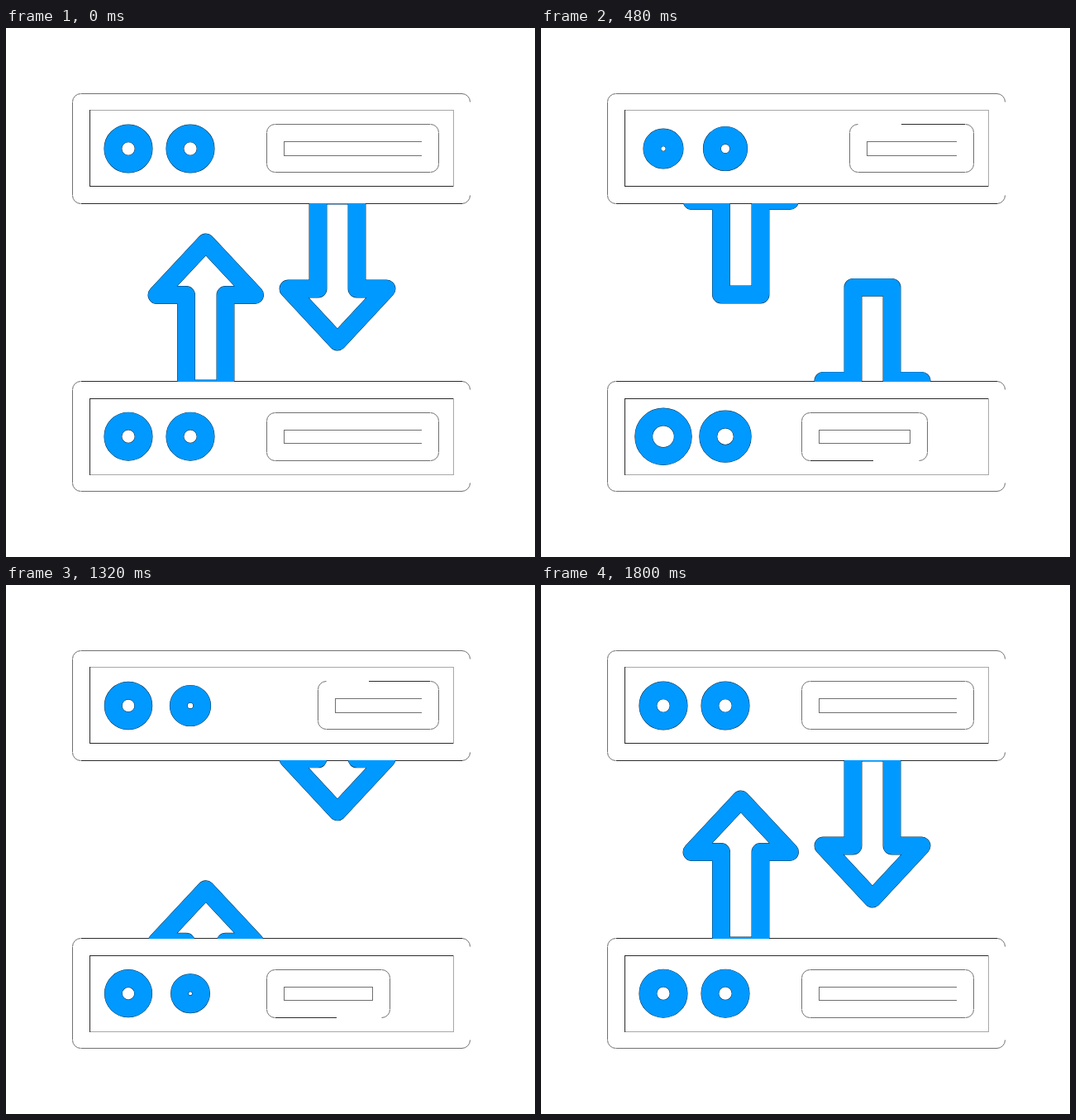
An HTML page with a canvas that plays this animation: 640 by 640 pixels, repeating every 1.82 s.

```html
<!DOCTYPE html>
<html lang="en">
<head>
<meta charset="utf-8">
<title>Server transfer</title>
<style>
  html, body { margin: 0; width: 100%; height: 100%; overflow: hidden; background: #fff; }
  canvas { display: block; width: 640px; height: 640px; }
</style>
</head>
<body>
<canvas id="stage" width="640" height="640"></canvas>
<script>
const ctx = document.getElementById('stage').getContext('2d');
const BLUE = '#0099ff', DARK = '#2b2b2b', MID = '#707070', GRAY = '#a8a8a8', EDGE = '#002a4a';
const STEP = 20, STEPS = 91, WEIGHT = 21;

const clamp = x => Math.max(0, Math.min(1, x));
const smooth = x => x * x * (3 - 2 * x);

// cubic-bezier(.5, 0, .5, 1)
function ease(x) {
  let lo = 0, hi = 1;
  for (let i = 0; i < 24; i++) {
    const s = (lo + hi) / 2;
    if (1.5 * s * (1 - s) + s * s * s < x) lo = s; else hi = s;
  }
  return smooth(lo);
}

// keys: [time, value] pairs with a smooth ramp between them
function track(keys, n) {
  let v = keys[0][1];
  for (let i = 1; i < keys.length; i++) {
    const [t0, v0] = keys[i - 1], [t1, v1] = keys[i];
    if (n >= t0) v = v0 + (v1 - v0) * smooth(clamp((n - t0) / (t1 - t0)));
  }
  return v;
}

const TOP_RING = [[0, 18.6], [27, 13.4], [46, 11.9], [69, 18.6]];
const LOW_RING = [[2, 18.6], [28, 24.1], [51, 12.2], [69, 18.6]];
const RING_LAG = 11;

const slide = n => ease(clamp((n - 2.4) / 42.6)) - ease(clamp((n - 46.9) / 40));

// signed distance travelled: leaves one server, then comes out of the other
const travel = (n, out, back) => n < 51 ? out * n : -back * Math.max(0, 89 - n);

const across = (x0, x1, y, color) => {
  ctx.fillStyle = color;
  ctx.fillRect(x0, y, x1 - x0, 1);
};
const down = (x, y0, y1, color) => {
  ctx.fillStyle = color;
  ctx.fillRect(x, y0, 1, y1 - y0);
};

function corner(cx, cy, r, turn) {
  ctx.strokeStyle = MID;
  ctx.lineWidth = 1;
  ctx.beginPath();
  ctx.arc(cx, cy, r, turn * Math.PI / 2, (turn + 1) * Math.PI / 2);
  ctx.stroke();
}

function corners(l, t, r, b, rad) {
  corner(r - rad + .5, b - rad + .5, rad, 0);
  corner(l + rad + .5, b - rad + .5, rad, 1);
  corner(l + rad + .5, t + rad + .5, rad, 2);
  corner(r - rad + .5, t + rad + .5, rad, 3);
}

function thick(path) {
  ctx.lineJoin = 'round';
  for (const [w, color] of [[WEIGHT + .9, EDGE], [WEIGHT, BLUE]]) {
    ctx.lineWidth = w;
    ctx.strokeStyle = color;
    ctx.beginPath();
    path();
    ctx.closePath();
    ctx.stroke();
  }
}

const ring = (x, y, r) => thick(() => ctx.arc(x, y, r, 0, Math.PI * 2));

// dir is 1 for an arrow pointing down, -1 for one pointing up
function arrow(x, neck, dir, half, wing, head, shaft, dy) {
  const y = neck + dir * dy;
  thick(() => {
    ctx.moveTo(x, y + dir * head);
    ctx.lineTo(x + wing, y);
    ctx.lineTo(x + half, y);
    ctx.lineTo(x + half, y - dir * shaft);
    ctx.lineTo(x - half, y - dir * shaft);
    ctx.lineTo(x - half, y);
    ctx.lineTo(x - wing, y);
  });
}

// the edges facing the gap between the servers are the darker ones
function server(top, panel, topColor, lowColor) {
  const low = top + 133;
  corners(80, top, 561, low, 10);
  across(91, 552, top, topColor);
  across(91, 552, low, lowColor);
  down(80, top + 11, low - 10, MID);
  across(101, 542, panel, lowColor === DARK ? GRAY : DARK);
  across(101, 542, panel + 92, lowColor === DARK ? DARK : GRAY);
  down(101, panel, panel + 93, DARK);
  down(541, panel, panel + 93, GRAY);
}

function slot(t, inTop, inLow, cutL, cutR) {
  const l = 315 + cutL, r = 523 - cutR, b = t + 58;
  corners(l, t, r, b, 10);
  down(l, t + 11, b - 10, MID);
  down(r, t + 11, b - 10, MID);

  // the long edges open up as the slot gets shorter
  const cut = cutL + cutR;
  const edge = (y, open) => {
    const from = open && cutL ? Math.round(404 + .56 * cutL) : l + 11;
    const to = open && cutR ? Math.round(432 - .54 * cutR) : r - 10;
    across(from, to, y, open ? DARK : MID);
  };
  edge(t, cut > (cutL ? 36 : 90));
  edge(b, cut > (cutR ? 36 : 90));

  const il = l + 21, ir = r - 21;
  across(il, ir + 1, inTop, MID);
  across(il, ir + 1, inLow, MID);
  down(il, inTop, inLow + 1, MID);
  if (cutR > 0) down(ir, inTop, inLow + 1, MID);
}

function draw(n) {
  ctx.fillStyle = '#fff';
  ctx.fillRect(0, 0, 640, 640);

  server(79, 99, MID, DARK);
  server(427, 448, DARK, MID);

  const s = slide(n);
  slot(116, 137, 154, Math.round(113.5 * s), 0);
  slot(465, 486, 502, 0, Math.round(109 * s));

  ring(148, 146, track(TOP_RING, n));
  ring(223, 146, track(TOP_RING, n - RING_LAG));
  ring(148, 494.2, track(LOW_RING, n));
  ring(223, 494.2, track(LOW_RING, n - RING_LAG));

  ctx.save();
  ctx.beginPath();
  ctx.rect(0, 212, 640, 216);
  ctx.clip();
  arrow(241.75, 323, -1, 23.75, 59.3, 63.5, 113.5, travel(n, 4.75, 4.73));
  arrow(401, 315.5, 1, 23.5, 59.5, 64, 113, travel(n, 4.64, 4.57));
  ctx.restore();
}

const start = performance.now();
function tick() {
  draw(Math.floor((performance.now() - start) / STEP) % STEPS);
  requestAnimationFrame(tick);
}
tick();
</script>
</body>
</html>
```
